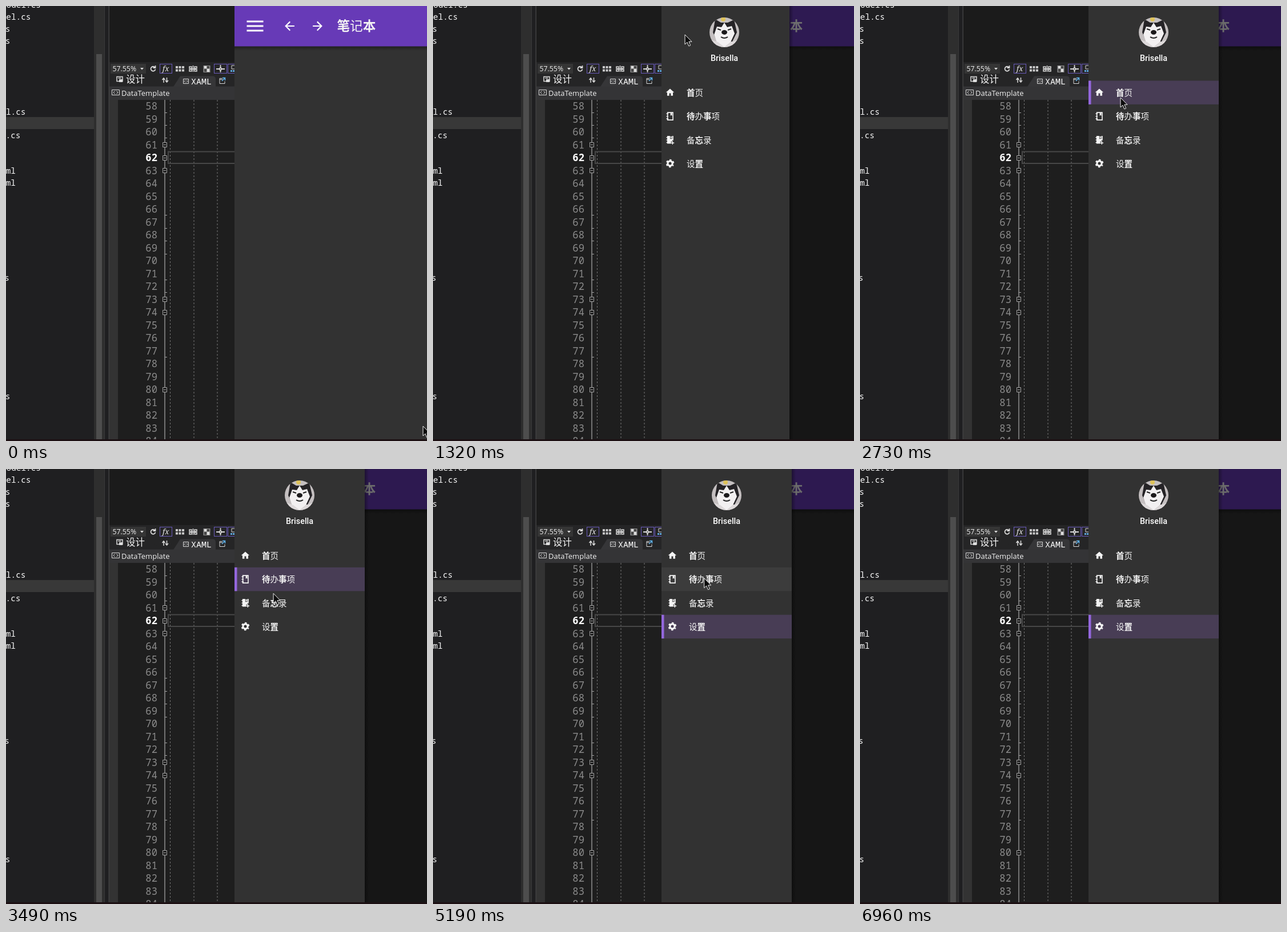
Recreate the animation shown at these times as an HTML page. Size 737x760 px, loop 7290 ms.

```html
<!DOCTYPE html>
<html lang="zh">
<head>
<meta charset="utf-8">
<title>Navigation drawer</title>
<style>
  html, body { margin: 0; width: 100%; height: 100%; overflow: hidden; background: #1f1f21; }
  svg { display: block; width: 737px; height: 760px; }
  text { white-space: pre; }
  .mono { font-family: "Noto Sans Mono", "DejaVu Sans Mono", monospace; }
  .ui { font-family: "Open Sans", "Noto Sans", sans-serif; fill: #f0f0f0; }
  .cjk { font-family: "Noto Sans CJK SC", "Noto Sans CJK", sans-serif; fill: #f4f4f4; font-weight: 300; }
  .b { font-weight: 700; }
  .line { fill: none; stroke: #d8d8d8; }
  .guide { stroke: #777; stroke-dasharray: 3 3; }
  .frame { fill: none; stroke: #6a5abb; }
</style>
</head>
<body>
<svg viewBox="0 0 737 760">
  <defs>
    <clipPath id="appClip"><rect x="400" width="337" height="760"/></clipPath>
    <clipPath id="faceClip"><circle cx="514" cy="46" r="26"/></clipPath>
    <linearGradient id="below" x2="0" y2="1">
      <stop stop-color="#000" stop-opacity=".4"/><stop offset="1" stop-color="#000" stop-opacity="0"/>
    </linearGradient>
    <linearGradient id="beside">
      <stop stop-color="#000" stop-opacity=".35"/><stop offset="1" stop-color="#000" stop-opacity="0"/>
    </linearGradient>
    <path id="arrow" d="M20 11V13H8L13.5 18.5L12.08 19.92L4.16 12L12.08 4.08L13.5 5.5L8 11Z" fill="#fff"/>
  </defs>

  <!-- file list -->
  <rect width="737" height="760" fill="#1f1f21"/>
  <rect y="194" width="154" height="21" fill="#383838"/>
  <g id="files" class="mono" font-size="14.4" fill="#fafafa" text-anchor="end"></g>
  <rect x="154" width="18.500" height="760" fill="#2e2e2e"/>
  <rect x="158" y="84" width="10" height="676" fill="#4d4d4d"/>
  <rect x="172" width="1" height="760" fill="#3a3a3a"/>
  <rect x="179.500" width="1.500" height="760" fill="#414141"/>

  <!-- designer bars -->
  <rect x="181" width="219" height="98" fill="#1b1b1b"/>
  <rect x="181" y="98" width="219" height="43" fill="#252526"/>
  <rect x="183" y="101" width="62" height="17" fill="#353535"/>
  <text class="ui" x="186.500" y="114" font-size="12.300">57.55%</text>
  <path d="M235 108h6l-3 3.500z" fill="#ddd"/>
  <path class="line" stroke-width="1.800" d="M260.500 107a4 4 0 1 0 1 3.500M261.500 104v4h-4"/>
  <rect class="frame" x="269.500" y="101.500" width="21" height="16"/>
  <text x="274" y="114" font-family="Noto Serif, Liberation Serif, serif" font-size="13" font-style="italic" fill="#eee">fx</text>
  <path d="M297 105h4v4h-4zm5.500 0h4v4h-4zm5.500 0h4v4h-4zM297 110.500h4v4h-4zm5.500 0h4v4h-4zm5.500 0h4v4h-4z" fill="#c8c8c8"/>
  <path class="line" stroke-width="1.500" d="M321 106h4v3h-4zM330 106h4v3h-4zM321 111h4v3h-4zM330 111h4v3h-4zM327.500 104v11M324 110h8"/>
  <rect x="345.500" y="104" width="12" height="12" fill="#909090"/>
  <path d="M347 105h4v4h-4zm5 5h4v5h-4z" fill="#ddd"/>
  <path d="M352 105h4v4h-4zm-5 5h4v5h-4z" fill="#444"/>
  <rect class="frame" x="364.500" y="101.500" width="22" height="16"/>
  <path class="line" stroke-width="1.800" d="M368 110h5m5 0h5M375.500 103v5m0 4v4M373 110l2.500-2.500 2.500 2.500-2.500 2.500z"/>
  <rect class="frame" x="388.500" y="101.500" width="22" height="16"/>
  <path class="line" d="M400 104h-5v6h5"/>
  <path d="M393 112h3v3h-3zm4 0h3v3h-3z" fill="#5fa8dd"/>
  <path class="line" d="M194 123.500h10v8h-10zM196.500 126h5" stroke-width="1.500"/>
  <path d="M198 128h6v5h-6z" fill="#ddd"/>
  <text class="cjk" x="210" y="134" font-size="16.500">设计</text>
  <path d="M181 141h102l12-19h0H246l26 17z" fill="#252526"/>
  <path class="line" stroke-width="1.500" d="M276 134v-8m-2.500 3l2.500-3 2.500 3M281.500 125v8m-2.500-3l2.500 3 2.500-3"/>
  <path d="M293 141L305 122.500H362Q367 122.500 367 128V141Z" fill="#363638"/>
  <path class="line" d="M310.500 127.500h9v8h-9zM314 129.500l-2 2 2 2m2-4l2 2-2 2"/>
  <text class="mono" x="324" y="137" font-size="15" fill="#fff">XAML</text>
  <path class="line" d="M379 126.500h-5v9h9v-4M374 128.500h5"/>
  <path d="M378 131l5-5m-4-.500h4.500v4.500" fill="none" stroke="#5fb2ec" stroke-width="1.500"/>
  <rect x="181" y="140.500" width="219" height="23.500" fill="#343436"/>
  <path class="line" d="M185.500 146.500h13v9h-13zM190.500 148.500l-2.500 2.500 2.500 2.500m3-5l2.500 2.500-2.500 2.500"/>
  <text class="ui" x="202" y="157" font-size="13">DataTemplate</text>

  <!-- editor -->
  <rect x="181" y="164" width="219" height="596" fill="#1e1e1e"/>
  <rect x="181" y="164" width="15" height="596" fill="#333"/>
  <path class="guide" d="M287.500 164V760M329 164V760M370 164V760"/>
  <rect x="284" y="254.500" width="130" height="20.500" fill="none" stroke="#474747" stroke-width="2"/>
  <path d="M278 164V760" stroke="#a2a2a2" stroke-width="1.300"/>
  <g id="marks" fill="#1e1e1e" stroke="#a2a2a2"></g>
  <g id="numbers" class="mono" font-size="17.200" fill="#8b8b8b" text-anchor="end"></g>

  <!-- app window -->
  <g clip-path="url(#appClip)">
    <rect x="400" width="337" height="760" fill="#323232"/>
    <rect x="400" y="70" width="337" height="8" fill="url(#below)"/>
    <rect x="400" width="337" height="70.500" fill="#673ab7"/>
    <path d="M421.500 27H450.500M421.500 35H450.500M421.500 43H450.500" stroke="#fff" stroke-width="3"/>
    <use href="#arrow" transform="translate(483.700 22.300) scale(1.060)"/>
    <use href="#arrow" transform="translate(558.300 22.300) scale(-1.060 1.060)"/>
    <text class="cjk" x="579.500" y="43" font-size="22.600"><tspan class="b">笔</tspan>记<tspan class="b">本</tspan></text>
    <rect id="shade" x="400" width="337" height="760"/>

    <g id="drawer">
      <rect x="628" width="7" height="760" fill="url(#beside)"/>
      <rect x="400" width="228" height="760" fill="#323232"/>
      <g clip-path="url(#faceClip)">
        <rect x="488" y="20" width="52" height="52" fill="#c4bfc0"/>
        <path d="M494 46L498 23 508 29H520L531 24 536 46 528 62H501Z" fill="#252326"/>
        <path d="M514 29L519 37 527 35 532 48 525 63 514 72 501 64 496 50 501 36 509 37Z" fill="#f2f0f1"/>
        <path d="M488 58L503 63 514 72H488ZM540 58L526 63 514 72H540Z" fill="#dedadb"/>
        <ellipse cx="514" cy="46" rx="5" ry="4" fill="#1b191b"/>
        <path d="M502 40l6 2M526 40l-6 2M508 54q6 4 12 0" fill="none" stroke="#222" stroke-width="2"/>
        <circle cx="512" cy="23" r="4" fill="#dfc35a"/>
      </g>
      <text x="514" y="95.500" text-anchor="middle" font-family="Roboto, sans-serif" font-weight="500" font-size="14.400" fill="#fff">Brisella</text>
      <g id="rows"></g>
      <g fill="#f4f4f4">
        <path transform="translate(410.300 142.300) scale(.72)" d="M10 20V14H14V20H19V12H22L12 3L2 12H5V20Z"/>
        <g transform="translate(410.300 184) scale(.72)">
          <path d="M6 3H19V21H6Z" fill="none" stroke="#f4f4f4" stroke-width="2.200"/>
          <path d="M3 5h5v2H3zm0 6h5v2H3zm0 6h5v2H3zM13 4h4v7l-2-2-2 2z"/>
        </g>
        <g transform="translate(410.300 225.500) scale(.72)">
          <path d="M5 2H20V13H17V16H14V21H5V19H3V17H5V13H3V11H5V7H3V5H5ZM17 15h2v3h3v2h-3v3h-2v-3h-3v-2h3z"/>
          <path d="M12 2h5v8l-2.500-2L12 10z" fill="#323232"/>
          <path d="M13 3h3v5l-1.500-1-1.500 1z"/>
        </g>
        <g transform="translate(419 275)" fill="none" stroke="#f4f4f4">
          <circle r="4.100" stroke-width="3.200"/>
          <circle r="6.200" stroke-width="2.200" stroke-dasharray="3.250 3.243" stroke-dashoffset="1.600" transform="rotate(30)"/>
        </g>
      </g>
      <g class="cjk" font-size="14.500">
        <text x="448" y="156.500"><tspan class="b">首</tspan>页</text>
        <text x="448" y="198"><tspan class="b">待</tspan>办<tspan class="b">事</tspan>项</text>
        <text x="448" y="239.500">备<tspan class="b">忘</tspan>录</text>
        <text x="448" y="280.500">设<tspan class="b">置</tspan></text>
      </g>
    </g>
  </g>

  <rect y="757" width="737" height="3" fill="#1c1013"/>
  <circle id="press" r="12" fill="#f2e30c" fill-opacity=".62"/>
  <path id="cursor" d="M0 0V17L4 13.300L6.800 20L9.700 18.800L6.900 12.300H12Z" fill="#0c0c0c" stroke="#f2f2f2"/>
</svg>
<script>
const LOOP = 7290, ROW_TOP = 130.5, ROW_H = 41.4;
const $ = id => document.getElementById(id);

function add(parent, tag, attrs, text = '') {
  const el = document.createElementNS('http://www.w3.org/2000/svg', tag);
  for (const k in attrs) el.setAttribute(k, attrs[k]);
  el.textContent = text;
  return $(parent).appendChild(el);
}

// static repeats
[['odel.cs', 61, 3], ['el.cs', 43.5, 24], ['s', 7.5, 45], ['s', 7.5, 66], ['l.cs', 34.5, 190],
 ['.cs', 25.5, 231], ['ml', 17, 293], ['ml', 17, 314], ['s', 6, 480], ['s', 7.5, 687]]
  .forEach(([s, x, y]) => add('files', 'text', { x, y }, s));

const lineY = n => 175 + (n - 58) * 22.49;
for (let n = 58; n <= 84; n++) {
  const look = n === 62 ? { fill: '#fff', 'font-weight': 700 } : {};
  add('numbers', 'text', { x: 265, y: lineY(n) + 6.3, ...look }, n);
}
[58, 59, 60, 66, 67, 68, 69, 71, 72, 77].forEach(n =>
  add('marks', 'path', { d: `M278 ${Math.round(lineY(n) + 10.5) + .5}h4` }));
[61, 62, 63, 73, 74, 80].forEach(n => {
  const y = Math.round(lineY(n)) + .5;
  add('marks', 'path', { d: `M274.5 ${y - 4}h7v8h-7zM276 ${y}h4` });
});

const rows = [0, 1, 2, 3].map(i => {
  const y = ROW_TOP + i * ROW_H;
  return {
    tint: add('rows', 'rect', { x: 400, y, width: 228, height: ROW_H }),
    bar: add('rows', 'rect', { x: 400, y, width: 4.5, height: ROW_H, fill: '#9467dd' })
  };
});

const ticks = [0];
[[70, 770, 11], [900, 900, 1], [1030, 1320, 5], [1370, 1370, 1], [1520, 2190, 11],
 [2260, 2940, 10], [3010, 3690, 10], [3760, 4170, 7], [4390, 4390, 1], [4520, 5060, 9],
 [5190, 5870, 9], [5940, 6350, 7], [6620, 6960, 6]].forEach(([a, b, n]) => {
  for (let i = 0; i < n; i++) ticks.push(n > 1 ? a + (b - a) * i / (n - 1) : a);
});

// pointer path: time, x, y
const path = [[0, 730, 734], [770, 432, 49], [900, 440, 49], [1320, 441, 50], [1500, 441, 50],
  [2120, 455, 161], [2730, 456, 160], [2940, 462, 190], [3080, 464, 194], [3250, 465, 194],
  [3620, 470, 232], [3740, 470, 232], [4100, 475, 274], [4390, 475, 274], [4720, 477, 299],
  [5060, 475, 210], [5400, 474, 151], [5700, 474, 153], [5870, 475, 194], [6350, 476, 239],
  [6550, 476, 239], [6960, 706, 770]];

// clicks: time down, time up, row selected (-1: menu button)
const clicks = [[770, 900, -1], [2190, 2260, 0], [3010, 3080, 1], [3690, 3760, 2], [4390, 4520, 3]];

function pointer(t) {
  const i = Math.max(1, path.findIndex(p => p[0] >= t));
  const [a, b] = t > 6960 ? [path.at(-1), path.at(-1)] : [path[i - 1], path[i]];
  let k = b[0] > a[0] ? (t - a[0]) / (b[0] - a[0]) : 0;
  k = k * k * (3 - 2 * k);
  return [a[1] + (b[1] - a[1]) * k, a[2] + (b[2] - a[2]) * k];
}

const rowAt = t => Math.floor((pointer(t)[1] - ROW_TOP) / ROW_H);

function draw(t) {
  const [x, y] = pointer(t);
  $('cursor').setAttribute('transform', `translate(${x} ${y})`);

  const held = clicks.some(c => t >= c[0] && t < c[1]);
  $('press').setAttribute('transform', `translate(${x} ${y})`);
  $('press').style.display = held ? '' : 'none';

  const p = Math.min(1, Math.max(0, (t - 1000) / 430));
  const open = 1 - (1 - p) ** 3;
  $('drawer').setAttribute('transform', `translate(${-236 * (1 - open)} 0)`);
  $('shade').setAttribute('fill-opacity', .56 * open);

  const last = clicks.filter(c => t >= c[0]).pop();
  const hover = t > 1520 && rowAt(t) === rowAt(t - 110) ? rowAt(t) : -1;
  rows.forEach(({ tint, bar }, i) => {
    const on = !!last && last[2] === i;
    tint.setAttribute('fill', on ? '#483d55' : '#fff');
    tint.setAttribute('fill-opacity', on ? 1 : hover === i ? .05 : 0);
    bar.style.display = on ? '' : 'none';
  });
}

function loop() {
  const t = performance.now() % LOOP;
  draw(ticks.filter(k => k <= t + .01).pop());
  requestAnimationFrame(loop);
}
loop();
</script>
</body>
</html>
```
